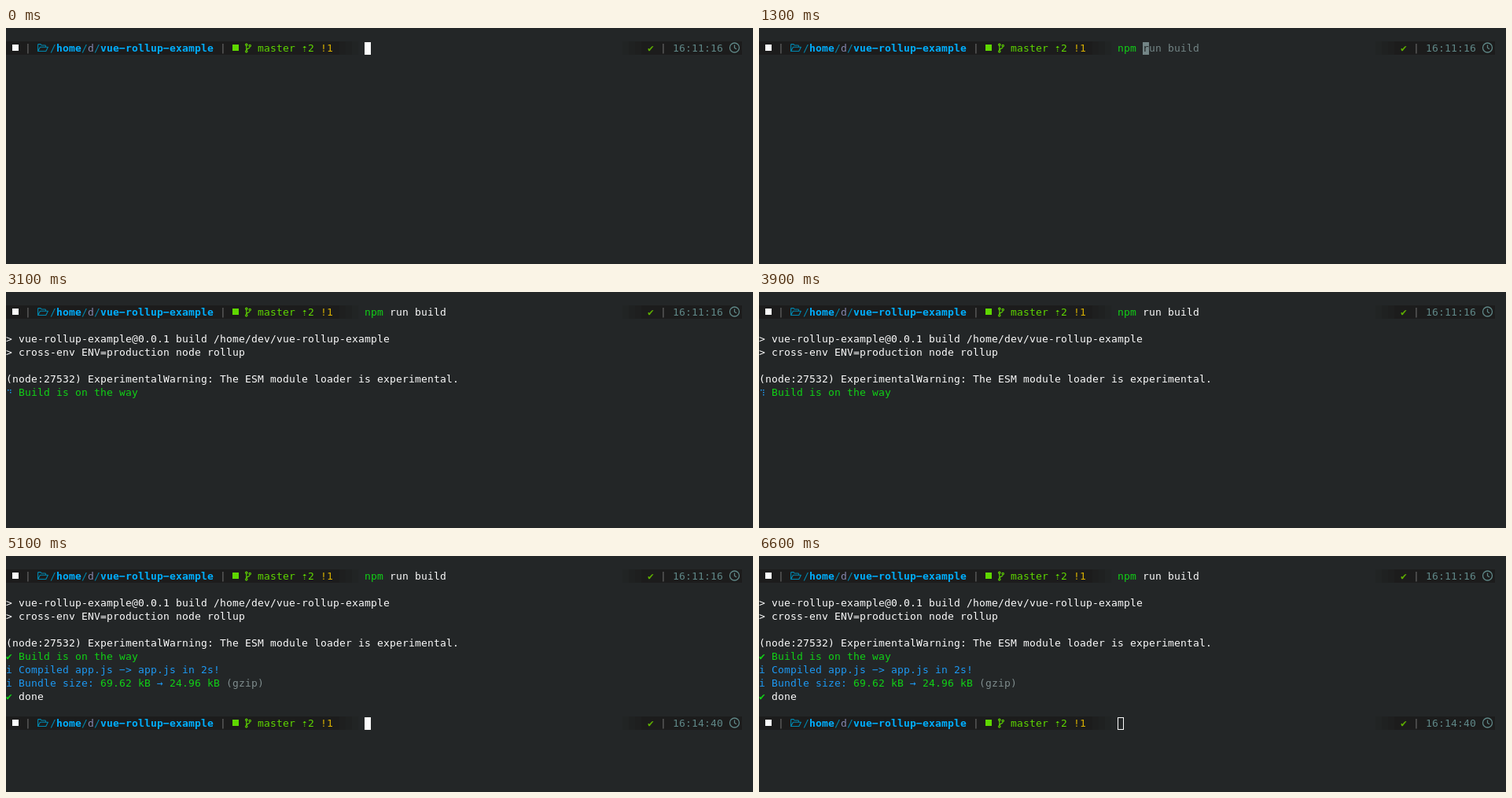
Recreate the animation shown at these times as an HTML page with a canvas. Size 950 px wide and 300 px high, loop 6.7 s.

```html
<!DOCTYPE html>
<html lang="en">
<head>
<meta charset="utf-8">
<title>Terminal build</title>
<style>
html, body { margin: 0; width: 950px; height: 300px; overflow: hidden; background: #232627; }
canvas { display: block; }
</style>
</head>
<body>
<canvas id="stage" width="950" height="300"></canvas>
<script>
const ctx = document.getElementById('stage').getContext('2d');
const LOOP = 6700, STEP = 100, CW = 8, LH = 17;
const FONT = '13px "DejaVu Sans Mono", "DejaVu Sans", monospace';
const BG = '#232627', WHITE = '#fcfcfc', GREEN = '#11d116', BLUE = '#1d99f3', GREY = '#7f8c8d', HINT = '#738586';
const SEG = '#1c1c1c', BAR = '#6c6c6c', DIR = '#0087af', ANCHOR = '#00afff', GIT = '#5fd700', CLOCK = '#5f8787';

const COMMAND = 'npm run build';
const KEYS = [800, 900, 1000, 1200];   // key presses for "npm "
const ACCEPT = 1700, ENTER = 2200, HEADER = 2500, SPIN = 2700, DONE = 5000, BLUR = 6400;

// Braille dots as column and row
const SPINNER = ['00 10 01', '00 10 11', '00 10 11 12', '10 11 12', '10 11 12 02',
  '11 12 02', '01 02 12', '00 01 02 12', '00 01 02', '00 10 01 02'];

function rect(x, y, w, h, color) {
  ctx.fillStyle = color;
  ctx.fillRect(x, y, w, h);
}

// Writes on the character grid and returns the next free column
function put(col, row, text, color = WHITE, bold = false) {
  ctx.font = (bold ? 'bold ' : '') + FONT;
  ctx.fillStyle = color;
  for (const ch of text) ctx.fillText(ch, CW * col++, LH * row + 13);
  return col;
}

function line(row, ...parts) {
  let col = 0;
  for (const [text, color] of parts) col = put(col, row, text, color);
}

function stroke(path, x, y, color, width = 1.1) {
  ctx.save();
  ctx.translate(x, y);
  ctx.strokeStyle = color;
  ctx.lineWidth = width;
  ctx.lineJoin = 'round';
  ctx.stroke(new Path2D(path));
  ctx.restore();
}

function cursor(col, row, hollow) {
  const x = CW * col, y = LH * row + 1;
  if (hollow) {
    ctx.strokeStyle = WHITE;
    ctx.lineWidth = 1;
    ctx.strokeRect(x + .5, y + .5, 7, 15);
  } else rect(x, y, 8, 16, WHITE);
}

function segment(from, to, row, fades) {
  rect(CW * from, LH * row, CW * (to - from), LH, SEG);
  fades.forEach((col, i) => {
    ctx.globalAlpha = .75 - .25 * i;
    rect(CW * col, LH * row, CW, LH, SEG);
  });
  ctx.globalAlpha = 1;
}

function prompt(row, time) {
  const y = LH * row;
  segment(0, 53, row, [53, 54, 55]);
  rect(8, y + 4, 8, 8, WHITE);
  put(3, row, '|', BAR);
  stroke('M.6 9.5V1.4Q.6.6 1.4.6H4L5.2 2H9.6Q10.4 2 10.4 2.8V4M.6 9.5L3.4 4.2H13.4L10.8 9.5Z', 40, y + 3, DIR);
  put(7, row, '/', DIR);
  put(8, row, 'home', ANCHOR, true);
  put(12, row, '/', DIR);
  put(13, row, 'd', '#8787af');
  put(14, row, '/', DIR);
  put(15, row, 'vue−rollup−example', ANCHOR, true);
  put(34, row, '|', BAR);
  rect(288, y + 4, 8, 8, GIT);
  stroke('M1.8 3V9M6.2 4.2Q6.2 6 4 6.6Q1.8 7.2 1.8 9M3 1.8A1.2 1.2 0 1 1 .6 1.8A1.2 1.2 0 1 1 3 1.8' +
    'M7.4 3A1.2 1.2 0 1 1 5 3A1.2 1.2 0 1 1 7.4 3M3 10.2A1.2 1.2 0 1 1 .6 10.2A1.2 1.2 0 1 1 3 10.2', 304, y + 2.5, GIT);
  put(40, row, 'master ⇡2', GIT);
  put(50, row, '!1', '#d7af00');

  segment(101, 117, row, [100, 99, 98]);
  put(102, row, '✔', '#5faf00');
  put(104, row, '|', BAR);
  put(106, row, time, CLOCK);
  stroke('M12 6A6 6 0 1 1 0 6A6 6 0 1 1 12 6M6 2.5V6.2L8.5 7.7', 920.5, y + 2, CLOCK, 1.3);
}

function command(t) {
  const typed = t >= ACCEPT ? COMMAND.length : KEYS.filter(k => t >= k).length;
  const col = 57 + typed;
  if (typed && typed < COMMAND.length) {
    put(col, 1, COMMAND.slice(typed), HINT);
    rect(CW * col, LH + 1, 8, 16, HINT);
    put(col, 1, COMMAND[typed], BG);
  } else if (t < ENTER) cursor(col, 1);
  put(57, 1, COMMAND.slice(0, Math.min(typed, 3)), GREEN);
  if (typed > 3) put(60, 1, COMMAND.slice(3, typed));
}

function spinner(t) {
  const i = Math.floor((t - 3100) / 76 + 11.6) % SPINNER.length;
  for (const [c, r] of SPINNER[i].split(' ')) rect(2 + 3 * c, 124 + 3 * r, 1.5, 1.5, BLUE);
}

function draw(t) {
  rect(0, 0, 950, 300, BG);
  prompt(1, '16:11:16');
  command(t);
  if (t >= ENTER && t < HEADER) cursor(0, 2);
  if (t >= HEADER) {
    line(3, ['> vue-rollup-example@0.0.1 build /home/dev/vue-rollup-example']);
    line(4, ['> cross-env ENV=production node rollup']);
  }
  if (t >= SPIN) {
    line(6, ['(node:27532) ExperimentalWarning: The ESM module loader is experimental.']);
    put(2, 7, 'Build is on the way', GREEN);
    if (t < DONE) spinner(t);
  }
  if (t >= DONE) {
    put(0, 7, '✔', GREEN);
    line(8, ['i Compiled app.js −> app.js in 2s!', BLUE]);
    line(9, ['i Bundle size: ', BLUE], ['69.62 kB', GREEN], [' → ', BLUE], ['24.96 kB', GREEN], [' (gzip)', GREY]);
    line(10, ['✔', GREEN], [' done']);
    prompt(12, '16:14:40');
    cursor(57, 12, t >= BLUR);
  }
}

const start = performance.now();
function tick() {
  const t = (performance.now() - start) % LOOP;
  draw(Math.floor(t / STEP) * STEP);
  requestAnimationFrame(tick);
}
tick();
</script>
</body>
</html>
```
